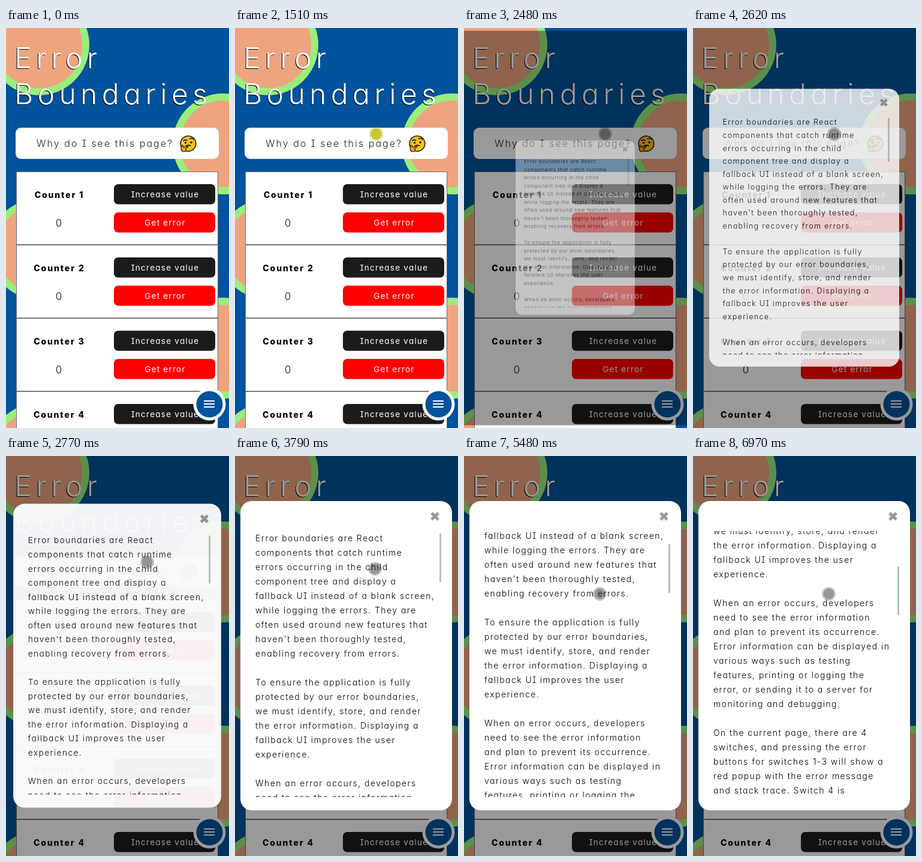
Recreate the animation shown at these times as an HTML page. Size 372x666 px, loop 8 s.

```html
<!DOCTYPE html>
<html lang="en">
<head>
<meta charset="utf-8">
<title>Error Boundaries</title>
<style>
  html, body { margin: 0; width: 100%; height: 100%; overflow: hidden; background: #00539c; }
  svg { display: block; width: 372px; height: 666px; font-family: Inter, "DejaVu Sans", sans-serif; font-feature-settings: "cv08", "cv11"; }
  .bubble { fill: #eea47f; stroke: #9bed7c; stroke-width: 12; }
  .title { font-size: 48px; font-weight: 300; letter-spacing: 7.4px; }
  .ask { font-size: 16px; font-weight: 300; letter-spacing: 2.05px; fill: #222; }
  .name { font-size: 14px; font-weight: 800; letter-spacing: 1.9px; text-anchor: middle; }
  .count { font-size: 17px; font-weight: 300; text-anchor: middle; fill: #111; }
  .label { font-size: 13.5px; letter-spacing: 1.25px; text-anchor: middle; fill: #fff; }
  .body { font-size: 14px; font-weight: 300; letter-spacing: 1.44px; fill: #000; }
</style>
</head>
<body>
<svg viewBox="0 0 372 666">
  <defs>
    <clipPath id="textClip"><rect x="20" y="125" width="318" height="443"/></clipPath>
  </defs>

  <rect width="372" height="666" fill="#00539c"/>
  <g class="bubble">
    <circle cx="55" cy="28" r="78"/>
    <circle cx="362" cy="193" r="78"/>
    <circle cx="55" cy="368" r="78"/>
    <circle cx="362" cy="533" r="78"/>
    <circle cx="55" cy="708" r="78"/>
  </g>

  <g class="title" fill="#000" transform="translate(-1 1)">
    <text x="14" y="67">Error</text><text x="14" y="127">Boundaries</text>
  </g>
  <g class="title" fill="#fff">
    <text x="14" y="67">Error</text><text x="14" y="127">Boundaries</text>
  </g>

  <rect x="16" y="166" width="339" height="52" rx="9" fill="#fff"/>
  <text class="ask" x="51" y="198">Why do I see this page?</text>

  <g transform="translate(304 192.5)" fill="none" stroke="#1d1a14" stroke-width="1.6" stroke-linecap="round">
    <circle r="12.8" fill="#fcc21b"/>
    <path d="M-8-5q3-2 6-.5M2-8q4-2 7 1"/>
    <path d="M-4 4q4-2.5 8-.5"/>
    <g fill="#1d1a14" stroke="none"><circle cx="-4.5" cy="-1.5" r="1.7"/><circle cx="5" cy="-2" r="1.7"/></g>
    <path d="M-11 4q1-3 2.5 0l.5 2 7-2q2 .5 0 2l-3 1.5q2 5-3 6-5 0-5-6z" fill="#f59f1c" stroke-width="1.2"/>
  </g>

  <rect x="17.5" y="239.5" width="336" height="440" fill="#fff" stroke="#6e6e6e"/>
  <g id="rows"></g>

  <circle cx="339.5" cy="626.5" r="27" fill="#fff"/>
  <circle cx="339.5" cy="626.5" r="22" fill="#00539c"/>
  <path d="M330 621h18M330 626h18M330 631h18" stroke="#fff" stroke-width="2"/>

  <rect id="shade" width="372" fill="#000" opacity=".4"/>

  <g id="modal">
    <rect x="9" y="75" width="353" height="515" rx="19" fill="#fff"/>
    <path d="M328 95l11 11M339 95l-11 11" stroke="#999" stroke-width="5"/>
    <g clip-path="url(#textClip)"><g id="copy" class="body"></g></g>
    <rect id="bar" x="341" width="3" height="81"/>
  </g>

  <g id="cursor"><circle id="halo" r="11.5"/><circle id="core" r="9"/></g>
</svg>

<script>
const LOOP = 8000;
const $ = id => document.getElementById(id);
const set = (el, attrs) => { for (const k in attrs) el.setAttribute(k, attrs[k]); };
const clamp = x => Math.min(1, Math.max(0, x));
const mix = (a, b, p) => a + (b - a) * p;
const sine = x => (1 - Math.cos(Math.PI * clamp(x))) / 2;

const copy = `Error boundaries are React
components that catch runtime
errors occurring in the child
component tree and display a
fallback UI instead of a blank screen,
while logging the errors. They are
often used around new features that
haven't been thoroughly tested,
enabling recovery from errors.

To ensure the application is fully
protected by our error boundaries,
we must identify, store, and render
the error information. Displaying a
fallback UI improves the user
experience.

When an error occurs, developers
need to see the error information
and plan to prevent its occurrence.
Error information can be displayed in
various ways such as testing
features, printing or logging the
error, or sending it to a server for
monitoring and debugging.

On the current page, there are 4
switches, and pressing the error
buttons for switches 1-3 will show a
red popup with the error message
and stack trace. Switch 4 is`;

$('copy').innerHTML = copy.split('\n')
  .map((line, i) => `<text x="34" y="${142 + i * 24}">${line}</text>`).join('');

const button = (y, fill, label) =>
  `<rect x="180" y="${y}" width="169" height="33.5" rx="7" fill="${fill}"/>
   <text class="label" x="265.5" y="${y + 22}">${label}</text>`;

$('rows').innerHTML = [1, 2, 3, 4].map(n => `<g transform="translate(0 ${(n - 1) * 122})">
  <text class="name" x="89" y="283">Counter ${n}</text>
  <text class="count" x="88" y="331">0</text>
  ${button(260, '#1a1c1b', 'Increase value')}
  ${button(307, '#f00', 'Get error')}
  <path d="M18 361h335" stroke="#777" stroke-width="2"/></g>`).join('');

// cubic-bezier(.42, 0, .58, 1)
function easeInOut(x) {
  x = clamp(x);
  let lo = 0, hi = 1, u = .5;
  for (let i = 0; i < 24; i++) {
    u = (lo + hi) / 2;
    const v = 1 - u;
    if (3 * v * v * u * .42 + 3 * v * u * u * .58 + u * u * u < x) lo = u; else hi = u;
  }
  return u * u * (3 - 2 * u);
}

// critically damped spring
function spring(ms, rate) {
  const x = Math.max(0, ms) * rate;
  return x > 10 ? 1 : 1 - (1 + x) * Math.exp(-x);
}

function drawShade(t) {
  const height = 666 * easeInOut((t - 1565) / 1000);
  set($('shade'), { y: 333 - height / 2, height });
}

function drawModal(t) {
  const age = t - 2347;
  const scroll = t < 5480 ? 0 : t < 6290 ? 100 : t < 6360 ? 200 : 300;
  const moved = t < 5480 ? -1e4 : t < 6290 ? 5480 : 6360;
  const idle = t - moved;
  set($('modal'), {
    transform: `translate(185.5 332.5) scale(${spring(age, .0141)}) translate(-185.5 -332.5)`,
    opacity: spring(age, .0109),
    visibility: age > 0 ? 'visible' : 'hidden'
  });
  set($('copy'), { transform: `translate(0 ${-scroll})` });
  set($('bar'), {
    y: 129 + Math.round(scroll * .184),
    fill: idle < 400 ? '#b8b8b8' : idle < 540 ? '#bbb' : '#bebebe'
  });
}

function drawCursor(t) {
  const a = sine(t / 960), b = sine((t - 3400) / 1270);
  const x = mix(339, 235.5, a) - 9 * b;
  const y = mix(658, 176.5, a) + 53 * b;
  const pressed = t >= 1510 && t < 1650;
  set($('cursor'), {
    transform: `translate(${x} ${y})`,
    visibility: t < 70 ? 'hidden' : 'visible'
  });
  set($('halo'), { fill: pressed ? 'rgba(190,200,0,.5)' : 'rgba(0,0,0,.22)' });
  set($('core'), { fill: pressed ? 'rgba(180,175,20,.6)' : 'rgba(0,0,0,.24)' });
}

function draw(t) {
  drawShade(t);
  drawModal(t);
  drawCursor(t);
}

const start = performance.now();
function tick() {
  draw((performance.now() - start) % LOOP);
  requestAnimationFrame(tick);
}
tick();
</script>
</body>
</html>
```
